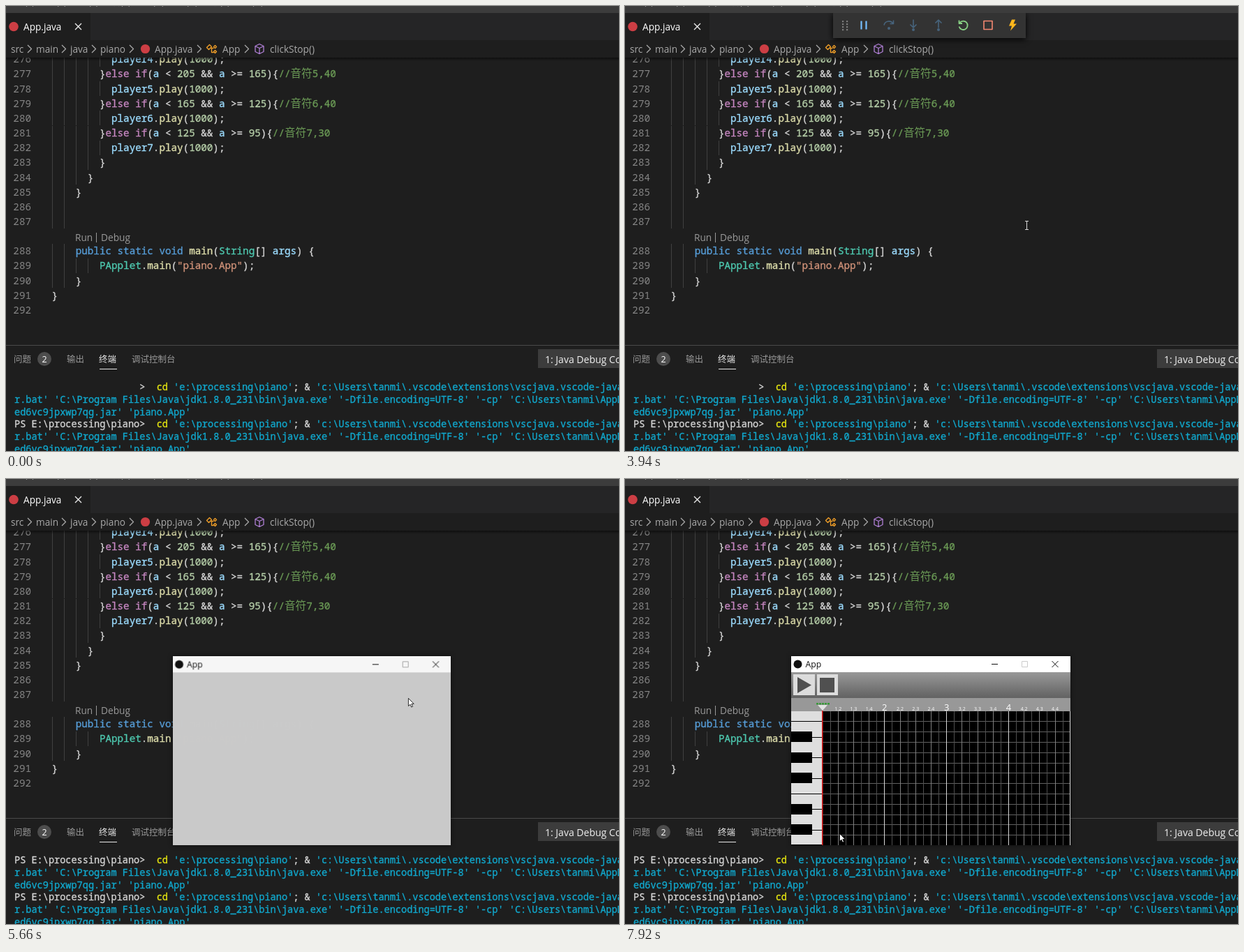
An HTML page with a canvas that plays this animation: 878x638 px, repeating every 8000 ms.

```html
<!DOCTYPE html>
<html lang="zh">
<head>
<meta charset="utf-8">
<style>
html, body { margin: 0; width: 100%; height: 100%; overflow: hidden; background: #1e1e1e; }
canvas { display: block; }
</style>
</head>
<body>
<canvas id="stage" width="878" height="638"></canvas>
<script>
const LOOP = 8000;
const UI = '"Open Sans", "Noto Sans CJK SC", "Noto Sans CJK", sans-serif';
const MONO = '"Noto Sans Mono", monospace';
const CJK = '"Noto Sans CJK SC", "Noto Sans CJK", sans-serif';
const C = {
  plain: '#d4d4d4', name: '#9cdcfe', fn: '#dcdcaa', num: '#b5cea8', key: '#c586c0',
  note: '#6a9955', word: '#569cd6', type: '#4ec9b0', str: '#ce9178',
  path: '#11a8cd', cmd: '#e5e510', shell: '#d4d4d4'
};
const CODE_X = 65.5, CODE_PITCH = 21.15, CHAR = 8.55;

const stage = document.getElementById('stage').getContext('2d');
const layer = document.createElement('canvas');
layer.width = 400;
layer.height = 271;
const app = layer.getContext('2d');

function rect(c, x, y, w, h, color) {
  c.fillStyle = color;
  c.fillRect(x, y, w, h);
}

function text(c, str, x, y, color, size, family = UI, align = 'left', weight = 400) {
  c.font = `${weight} ${size}px ${family}`;
  c.textAlign = align;
  c.fillStyle = color;
  c.fillText(str, x, Math.round(y));
}

function disc(c, x, y, r, color) {
  c.fillStyle = color;
  c.beginPath();
  c.arc(x, y, r, 0, 7);
  c.fill();
}

function shape(c, d, x, y, { fill, stroke, width = 1 }) {
  const path = new Path2D(d);
  c.save();
  c.translate(x, y);
  c.lineWidth = width;
  if (fill) { c.fillStyle = fill; c.fill(path); }
  if (stroke) { c.strokeStyle = stroke; c.stroke(path); }
  c.restore();
}

function fade(c, y0, y1, from, to) {
  const g = c.createLinearGradient(0, y0, 0, y1);
  g.addColorStop(0, from);
  g.addColorStop(1, to);
  return g;
}

// Linear interpolation through rows of [time, ...values].
function track(rows, t) {
  if (t <= rows[0][0]) return rows[0].slice(1);
  const i = rows.findIndex(row => row[0] > t);
  if (i < 0) return rows[rows.length - 1].slice(1);
  const [a, b] = [rows[i - 1], rows[i]];
  const k = (t - a[0]) / (b[0] - a[0]);
  return a.slice(1).map((v, j) => v + (b[j + 1] - v) * k);
}

// Monospaced runs get a hairline outline to match dense screen hinting.
function runs(c, x, y, size, tokens) {
  c.lineWidth = .35;
  c.lineJoin = 'round';
  for (const [str, color] of tokens) {
    if (/[\u4e00-\u9fff]/.test(str)) {
      text(c, str, x, y, color, 15.6, CJK, 'left', 300);
    } else {
      text(c, str, x, y, color, size, MONO);
      c.strokeStyle = color;
      c.strokeText(str, x, Math.round(y));
    }
    x += c.measureText(str).width;
  }
}

const play = n => [10, [['player' + n, C.name], ['.', C.plain], ['play', C.fn],
  ['(', C.plain], ['1000', C.num], [');', C.plain]]];
const branch = (hi, lo, note) => [8, [['}', C.plain], ['else if', C.key], ['(', C.plain],
  ['a', C.name], [' < ', C.plain], [hi, C.num], [' && ', C.plain], ['a', C.name],
  [' >= ', C.plain], [lo, C.num], ['){', C.plain],
  ['//', C.note], ['音符', C.note], [note, C.note]]];
const brace = col => [col, [['}', C.plain]]];

const CODE = [
  play(4), branch('205', '165', '5,40'), play(5), branch('165', '125', '6,40'),
  play(6), branch('125', '95', '7,30'), play(7),
  brace(8), brace(6), brace(4), [4, []], [4, []],
  [4, [['public static void', C.word], [' main', C.fn], ['(', C.plain], ['String', C.type],
    ['[] ', C.plain], ['args', C.name], [') {', C.plain]]],
  [8, [['PApplet', C.type], ['.', C.plain], ['main', C.fn], ['(', C.plain],
    ['"piano.App"', C.str], [');', C.plain]]],
  brace(4), brace(0), [0, []]
];

function drawCode(c, hoverRun) {
  c.save();
  c.beginPath();
  c.rect(0, 74, 878, 412);
  c.clip();
  CODE.forEach(([col, tokens], i) => {
    const mid = 76.3 + CODE_PITCH * (i + (i > 11));
    for (let g = 0; g < col; g += 2) {
      rect(c, Math.round(CODE_X + g * CHAR), Math.round(mid - 10.5), 1, 21, '#404040');
    }
    text(c, String(276 + i), 36, mid + 5, '#858585', 14.25, MONO, 'right');
    runs(c, CODE_X + col * CHAR, mid + 5, 14.25, tokens);
  });
  text(c, 'Run', 99, 337, hoverRun ? '#4e94ce' : '#999999', 13.7);
  rect(c, 129, 325, 1, 14, '#999999');
  text(c, 'Debug', 136, 337, '#999999', 13.7);
  rect(c, 0, 74, 878, 5, fade(c, 73, 79, 'rgba(0,0,0,.6)', 'rgba(0,0,0,0)'));
  c.restore();
}

function drawHeader(c) {
  rect(c, 0, 0, 878, 10, '#3c3c3c');
  text(c, '文件(F)  编辑(E)  选择(S)  查看(V)  转到(G)  调试(D)  终端(T)  帮助(H)', 2, -1, '#aaaaaa', 12.5);
  rect(c, 0, 10, 878, 39, '#252526');
  rect(c, 0, 10, 121, 39, '#1e1e1e');
  disc(c, 11, 29.5, 6.8, '#cc3e44');
  text(c, 'App.java', 25, 35, '#ffffff', 13.65);
  shape(c, 'M-4.5-4.5 4.5 4.5M4.5-4.5-4.5 4.5', 103.5, 29.5, { stroke: '#e8e8e8', width: 1.4 });

  const crumbs = [['src', 7], ['main', 43], ['java', 92], ['piano', 135],
    ['App.java', 213], ['App', 310], ['clickStop()', 378]];
  for (const [label, x] of crumbs) text(c, label, x, 67, '#a9a9a9', 13.65);
  for (const x of [34, 83, 126, 180, 277, 345]) {
    shape(c, 'M-3-5.5 2.5 0-3 5.5', x, 61.5, { stroke: '#a9a9a9', width: 1.3 });
  }
  disc(c, 199.5, 61.5, 6.6, '#cc3e44');
  shape(c, 'M-6-2-2-6 1-3-3 1ZM0-1H4M1-1V5H4M4-3 6-5 8-3 6-1ZM4 4 6 2 8 4 6 6Z', 293.5, 61.5,
    { stroke: '#ee9d28', width: 1.4 });
  shape(c, 'M0-7 6-4V4L0 7-6 4V-4ZM-6-4 0-1 6-4M0-1V7', 363, 61.5,
    { stroke: '#b180d7', width: 1.3 });
}

function drawPanel(c, promptShown) {
  rect(c, 0, 486, 878, 1, '#4a4a4a');
  const tabs = [['问题', 11], ['输出', 87], ['终端', 133], ['调试控制台', 180]];
  tabs.forEach(([label, x], i) => text(c, label, x, 511, i === 2 ? '#e7e7e7' : '#999999', 12.5, CJK));
  rect(c, 134, 520, 25, 1, '#e7e7e7');
  disc(c, 55, 506, 10, '#4d4d4d');
  text(c, '2', 55, 511, '#ffffff', 12.5, UI, 'center');
  rect(c, 762, 492, 116, 27, '#3c3c3c');
  text(c, '1: Java Debug Console', 772, 512, '#f0f0f0', 14);

  const lineY = i => 551 + i * 17.8;
  for (const i of [0, 3]) {
    const prompt = i || promptShown ? 'PS E:\\processing\\piano>  ' : ' '.repeat(22) + '>  ';
    runs(c, 12, lineY(i), 13.58, [
      [prompt, C.shell], ['cd ', C.cmd], ["'e:\\processing\\piano'", C.path], ['; & ', C.shell],
      ["'c:\\Users\\tanmi\\.vscode\\extensions\\vscjava.vscode-java-debug", C.path]
    ]);
    runs(c, 12, lineY(i + 1), 13.58, [[
      "r.bat' 'C:\\Program Files\\Java\\jdk1.8.0_231\\bin\\java.exe' '-Dfile.encoding=UTF-8' '-cp' 'C:\\Users\\tanmi\\AppData", C.path
    ]]);
    runs(c, 12, lineY(i + 2), 13.58, [["ed6vc9jpxwp7qg.jar' 'piano.App'", C.path]]);
  }
}

function drawDebugBar(c) {
  c.save();
  c.shadowColor = '#000';
  c.shadowBlur = 8;
  c.shadowOffsetY = 2;
  c.beginPath();
  c.rect(290, 10, 300, 60);
  c.clip();
  rect(c, 298, 10, 276, 36, '#333333');
  c.restore();
  for (let i = 0; i < 8; i++) {
    rect(c, 311 + (i % 2) * 6, 21 + (i >> 1) * 4, 2.2, 2.2, '#7d7d7d');
  }
  const dim = '#47647d', y = 27.5;
  shape(c, 'M-3.5-6V6M3.5-6V6', 342, y, { stroke: '#75beff', width: 2.2 });
  shape(c, 'M-7 0A7 7 0 0 1 6-2M6.5-7V-2H1.5', 378, y, { stroke: dim, width: 1.6 });
  disc(c, 378, 32, 2, dim);
  shape(c, 'M0-8V3M-4.5-1 0 3.5 4.5-1', 413, y, { stroke: dim, width: 1.6 });
  disc(c, 413, 34, 2, dim);
  shape(c, 'M0 4V-7M-4.5-3 0-7.5 4.5-3', 449, y, { stroke: dim, width: 1.6 });
  disc(c, 449, 34, 2, dim);
  shape(c, 'M-5-3.5A6.2 6.2 0 1 1-6 2M-6-7V-2.5H-1.5', 484.5, y, { stroke: '#89d185', width: 1.8 });
  shape(c, 'M-6-6H6V6H-6Z', 520, y, { stroke: '#f48771', width: 1.6 });
  shape(c, 'M-1-8H4L1.5-2H6L-3 8-1 1H-5Z', 555, y, { fill: '#ffb71c' });
}

function drawSequencer(c) {
  const left = 45, top = 79, step = 22.2;
  const beatX = n => Math.min(399, Math.floor(left + n * step));
  const rowY = n => Math.floor(top + n * 14.8);
  rect(c, 0, 23, 400, 37, fade(c, 23, 60, '#989898', '#626262'));
  rect(c, 3, 26, 31, 30, '#dcdcdc');
  rect(c, 37, 26, 30, 30, '#dcdcdc');
  shape(c, 'M0 0 20 11.5 0 23Z', 9, 30, { fill: '#505050' });
  rect(c, 41, 31, 21, 21, '#505050');
  rect(c, 0, 60, 400, 19, '#989898');

  rect(c, left, top, 355, 192, '#000');
  for (let i = 1; i < 13; i++) rect(c, left, rowY(i), 355, 1, '#606060');
  for (let i = 1; i <= 32; i++) {
    const color = i % 2 ? '#505050' : i % 8 ? '#808080' : '#d8d8d8';
    rect(c, beatX(i / 2), top, 1, 192, color);
  }
  for (let i = 1; i < 16; i++) {
    const bar = 1 + (i >> 2), beat = 1 + i % 4;
    if (beat === 1) text(c, String(bar), left + i * step, 77.5, '#fff', 13, UI, 'center');
    else text(c, `${bar}.${beat}`, left + i * step, 78, '#fff', 7, UI, 'center');
  }

  rect(c, 0, top, left, 192, '#dedede');
  for (const y of [93, 116, 145, 175, 197, 219, 249, 270]) rect(c, 0, y, left, 1, '#000');
  for (const k of [2, 4, 6, 9, 11]) rect(c, 0, rowY(k), 30, 15, '#000');
  rect(c, left - 1, top - 1, 1.5, 193, '#e02020');
  shape(c, 'M-7 0H7L0 8Z', left, 70, { fill: '#e2e2e2' });
  for (let x = left - 9; x < left + 9; x += 4) rect(c, x, 67, 3, 2.5, '#389a38');
}

function drawAppWindow(c, t) {
  const [scale, alpha, white] = track([
    [5440, .936, 0, 204], [5480, .952, .05, 204], [5560, .984, .885, 204],
    [5640, .996, .98, 245], [5700, 1, 1, 255]
  ], t);
  if (!alpha) return;
  rect(app, 0, 0, 400, 271, '#cccccc');
  rect(app, 0, 0, 400, 23, `rgb(${white},${white},${white})`);
  disc(app, 9.5, 11.5, 6, '#111111');
  text(app, 'App', 20.5, 15.8, '#111111', 12.2);
  shape(app, 'M287 11.5H296M373.5 7 382.5 16M382.5 7 373.5 16', 0, 0, { stroke: '#111111' });
  shape(app, 'M330.5 7.5H338.5V15.5H330.5Z', 0, 0, { stroke: alpha < 1 ? '#a8a8a8' : '#cccccc' });
  if (t >= 6780) drawSequencer(app);

  c.save();
  c.globalAlpha = alpha;
  c.shadowColor = 'rgba(0,0,0,.6)';
  c.shadowBlur = 6;
  c.translate(438, 389.5);
  c.scale(scale, scale);
  c.drawImage(layer, -200, -135.5);
  c.restore();
}

const POINTER = [
  [260, 543, 614], [400, 577, 493], [680, 577, 493], [780, 688, 418],
  [1160, 688, 418], [1350, 630, 461], [1600, 400, 430], [1950, 129, 345],
  [2000, 129, 345], [2150, 134, 337], [2410, 115.5, 333],
  [2850, 115.5, 333], [2920, 150, 336], [3260, 575.5, 315], [3939, 575.5, 315],
  [3940, 575.5, 314], [4129, 575.5, 314], [4130, 576, 314],
  [5950, 576, 314], [6300, 500, 370], [6730, 392, 442], [7060, 392, 442],
  [7460, 308, 508], [7630, 308, 508], [7770, 307, 509], [7919, 307, 509], [7920, 307, 508]
];

const onRun = t => t >= 2040 && t < 2890;

function drawPointer(c, t) {
  if (t < 260) return;
  const [x, y] = track(POINTER, t);
  const overText = y < 486 || y > 525;
  if (onRun(t)) {
    shape(c, 'M-1.5 1Q0-1 1.5 1V5L5 6Q7 6.5 6.5 10L5 15H-1.5L-4.5 10Q-5 8-3 8L-1.5 9Z', x, y,
      { fill: '#fff', stroke: '#000', width: .8 });
    shape(c, 'M1.5 5V8M3.6 6V8', x, y, { stroke: '#000', width: .6 });
  } else if (overText && t < 5380) {
    shape(c, 'M-2.5-6H2.5M0-6V6M-2.5 6H2.5', Math.floor(x) + .5, Math.floor(y) + .5, { stroke: '#d8d8d8' });
  } else {
    shape(c, 'M.4.4V11.5L3 9.2 4.7 13 6.5 12.2 4.8 8.4H8.2Z', x, y,
      { fill: '#fff', stroke: '#000', width: .8 });
  }
}

function draw(t) {
  rect(stage, 0, 0, 878, 638, '#1e1e1e');
  drawCode(stage, onRun(t));
  drawHeader(stage);
  drawPanel(stage, t >= 4480);
  if (t >= 2890 && t < 5380) drawDebugBar(stage);
  drawAppWindow(stage, t);
  drawPointer(stage, t);
}

function tick() {
  draw(performance.now() % LOOP);
  requestAnimationFrame(tick);
}
tick();
</script>
</body>
</html>
```
